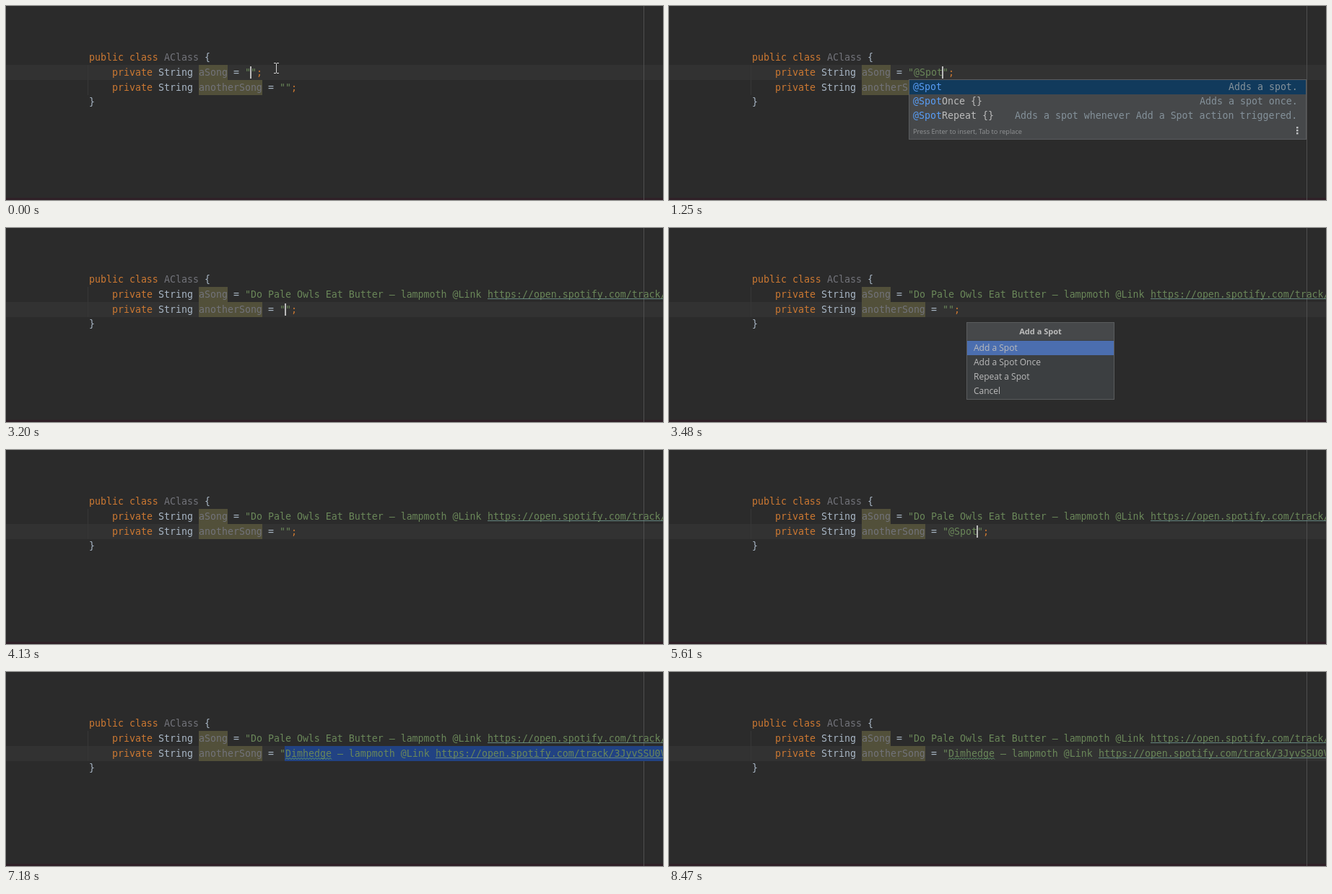
An HTML page with a canvas that plays this animation: 910x270 px, repeating every 8.93 s.

```html
<!DOCTYPE html>
<html lang="en">
<head>
<meta charset="utf-8">
<title>Code completion in an editor</title>
<style>
  html, body { margin: 0; width: 100%; height: 100%; overflow: hidden; background: #2b2b2b; }
  canvas { display: block; }
</style>
</head>
<body>
<canvas id="stage" width="910" height="270"></canvas>
<script>
const ctx = document.getElementById("stage").getContext("2d");
const W = 910, H = 270, LOOP = 8930;
const CELL = 8, LEFT = 115, TOP = 61, ROW = 21;
const MONO = '13.288px "DejaVu Sans Mono", "Noto Sans Mono", monospace';
const UI = '"Open Sans", "Noto Sans", sans-serif';

const C = {
  bg: "#2b2b2b", row: "#323232", margin: "#4f4f4f", guide: "#373737", strip: "#2f2027",
  keyword: "#cc7832", plain: "#a9b7c6", unused: "#72737a", unusedBg: "#52503a",
  string: "#6a8759", link: "#668780", typo: "#659c6b", caret: "#bbbbbb", selection: "#214283",
  popup: "#46484a", popupEdge: "#5a5c5e", chosen: "#113a5c", match: "#589df6",
  item: "#bbbbbb", tail: "#84919a", hint: "#929496", menuChosen: "#4b6eaf"
};

const LINK = "https://open.spotify.com/track/";
const FIRST = { text: "Do Pale Owls Eat Butter – lampmoth @Link ", link: LINK };
const SECOND = { text: "Dimhedge – lampmoth @Link ", link: LINK + "3JyvSSU0V0", typo: 8 };
const COMPLETIONS = [
  ["", "Adds a spot."],
  ["Once {}", "Adds a spot once."],
  ["Repeat {}", "Adds a spot whenever Add a Spot action triggered."]
];
const MENU = ["Add a Spot", "Add a Spot Once", "Repeat a Spot", "Cancel"];

// Value of the latest [time, value] step that has begun.
function at(t, steps) {
  let value = steps[0][1];
  for (const [time, next] of steps) if (t >= time) value = next;
  return value;
}
const within = (t, from, to) => t >= from && t < to;
const rowTop = n => TOP + n * ROW;

function box(x, y, w, h, color) {
  ctx.fillStyle = color;
  ctx.fillRect(x, y, w, h);
}

// Draws text and returns the x just after it.
function put(str, x, y, color, font = MONO) {
  ctx.font = font;
  ctx.fillStyle = color;
  ctx.fillText(str, x, y);
  return x + str.length * CELL;
}

function squiggle(x, y, w) {
  ctx.strokeStyle = C.typo;
  ctx.lineWidth = 1;
  ctx.beginPath();
  for (let i = 0; i <= w; i += 2) ctx.lineTo(x + i, y + (i % 4 ? 0.5 : 2.5));
  ctx.stroke();
}

function field(n, name, content, state) {
  const top = rowTop(n), base = top + 15;
  let x = LEFT + 4 * CELL;
  x = put("private ", x, base, C.keyword);
  x = put("String ", x, base, C.plain);
  box(x, top, name.length * CELL, ROW, C.unusedBg);
  x = put(name, x, base, C.unused);
  x = put(" = ", x, base, C.plain);
  x = put('"', x, base, C.string);
  const start = x;
  if (state.selected) box(start - 1, top, W - start + 1, ROW, C.selection);
  x = put(content.text, x, base, C.string);
  if (content.link) {
    const from = x;
    x = put(content.link, x, base, C.string);
    if (state.underlined) box(from, top + 16, x - from, 1, C.link);
    if (state.typo) squiggle(start, top + 16, content.typo * CELL);
  }
  x = put('"', x, base, C.string);
  put(";", x, base, C.keyword);
}

function caret(x, n) {
  box(x, rowTop(n) + 2, 2, 17, C.caret);
}

function completion(x, y) {
  const w = 551, h = 84;
  box(x, y, w, h, C.popupEdge);
  box(x + 1, y + 1, w - 2, h - 2, C.popup);
  box(x + 1, y + 1, w - 2, 20, C.chosen);
  COMPLETIONS.forEach(([rest, tail], i) => {
    const base = y + 15 + i * 20;
    const after = put("@Spot", x + 6, base, C.match);
    put(rest, after, base, C.item);
    put(tail, x + 539 - tail.length * CELL, base, C.tail);
  });
  put("Press Enter to insert, Tab to replace", x + 6, y + 76, C.hint, "9.2px " + UI);
  for (let i = 0; i < 3; i++) box(x + 537, y + 66 + i * 4, 2.5, 2.5, "#c0c2c4");
}

function menu(x, y, chosen) {
  const w = 205, h = 108;
  box(x, y, w, h, C.popupEdge);
  box(x + 1, y + 1, w - 2, h - 2, "#3c3f41");
  box(x + 1, y + 1, w - 2, 24, C.popup);
  ctx.textAlign = "center";
  put("Add a Spot", x + w / 2, y + 17, C.item, "bold 11px " + UI);
  ctx.textAlign = "left";
  box(x + 1, y + 26 + chosen * 20, w - 2, 20, C.menuChosen);
  MENU.forEach((label, i) => put(label, x + 10, y + 40 + i * 20, C.item, "12px " + UI));
}

function pointer(x, y) {
  const color = "#d6d6d6";
  box(x, y - 6, 1, 13, color);
  for (const edge of [y - 7, y + 7]) {
    box(x - 3, edge, 3, 1, color);
    box(x + 1, edge, 3, 1, color);
  }
}

function draw(t) {
  const current = t < 2650 ? 1 : 2;
  box(0, 0, W, H, C.bg);
  box(0, rowTop(current), W, ROW, C.row);
  box(113, rowTop(1), 1, 2 * ROW, C.guide);
  box(0, 267, W, 3, C.strip);
  box(883, 0, 1, H, C.margin);

  let x = put("public class ", LEFT, rowTop(0) + 15, C.keyword);
  x = put("AClass ", x, rowTop(0) + 15, C.unused);
  put("{", x, rowTop(0) + 15, C.plain);
  put("}", LEFT, rowTop(3) + 14, C.plain);

  const typedA = at(t, [[0, ""], [260, "@"], [550, "@S"], [760, "@Sp"], [870, "@Spo"], [970, "@Spot"]]);
  const typedB = at(t, [[0, ""], [4960, "@"], [5240, "@S"], [5420, "@Sp"], [5610, "@Spot"]]);

  field(1, "aSong", t < 2090 ? { text: typedA } : FIRST,
    { selected: within(t, 2090, 2370), underlined: t >= 2370 });
  field(2, "anotherSong", t < 6810 ? { text: typedB } : SECOND,
    { selected: within(t, 6810, 7360), underlined: t >= 7090, typo: t >= 7180 });

  if (t < 2090) {
    if (!within(t, 180, 260)) caret(338 + typedA.length * CELL, 1);
  } else if (within(t, 2650, 3480)) {
    caret(at(t, [[2650, 402], [3020, 394], [3200, 386]]), 2);
  } else if (within(t, 4410, 4870) || within(t, 4960, 6810)) {
    caret(386 + typedB.length * CELL, 2);
  }

  if (within(t, 1250, 1530)) completion(332, 102);
  if (within(t, 3480, 4130)) menu(412, 131, t < 3850 ? 0 : 1);
  if (within(t, 5980, 6350)) completion(380, 123);

  const mouse = at(t, [[0, [374, 86]], [260, null], [8200, [381, 89]],
    [8290, [462, 157]], [8380, [574, 221]], [8470, null]]);
  if (mouse) pointer(...mouse);
}

function frame() {
  draw(performance.now() % LOOP);
  requestAnimationFrame(frame);
}
frame();
</script>
</body>
</html>
```
